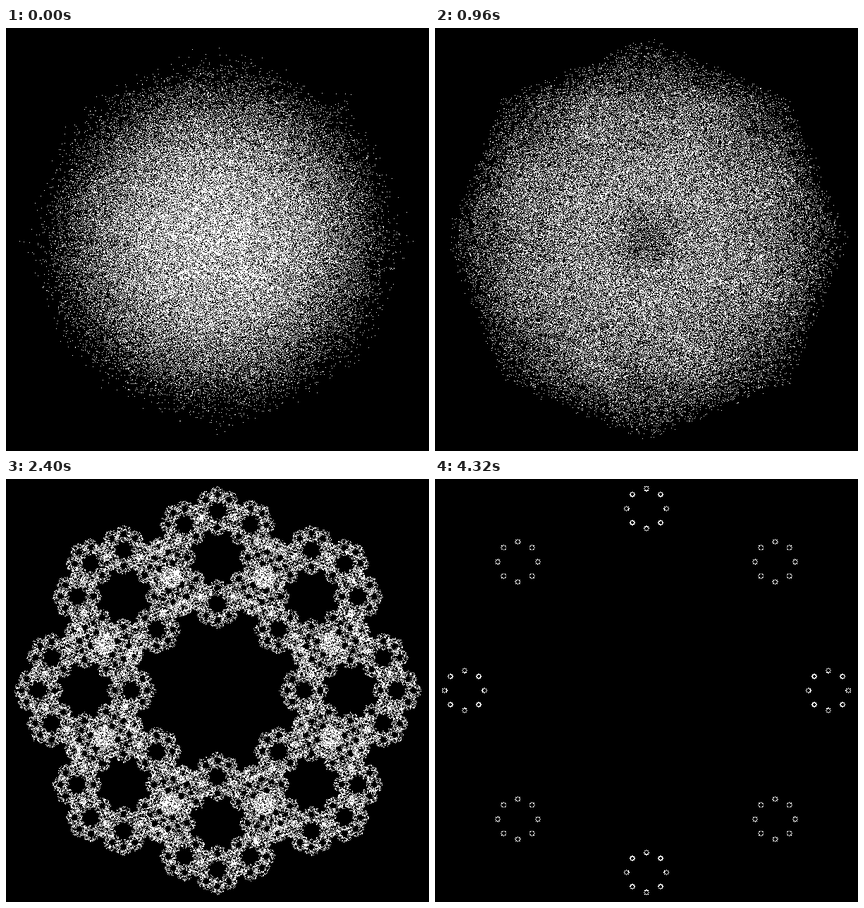
Recreate the animation shown at these times as an HTML page with a canvas. Size 600x600 px, loop 4.4 s.

```html
<!DOCTYPE html>
<html lang="en">
<head>
<meta charset="utf-8">
<title>Chaos game on an octagon</title>
<style>
  html, body { margin: 0; width: 100%; height: 100%; overflow: hidden; background: #000; }
  canvas { display: block; }
</style>
</head>
<body>
<canvas id="stage" width="600" height="600"></canvas>
<script>
const SIZE = 600, CENTER = 300, RADIUS = 290;
const STEPS = 55, STEP_MS = 80, POINTS = 100000;
const BLACK = 0xff000000, WHITE = 0xffffffff;

const ctx = document.getElementById('stage').getContext('2d');
const image = ctx.createImageData(SIZE, SIZE);
const pixels = new Uint32Array(image.data.buffer);

const corners = Array.from({ length: 8 }, (_, i) => {
  const angle = i * Math.PI / 4;
  return [CENTER + RADIUS * Math.cos(angle), CENTER + RADIUS * Math.sin(angle)];
});

// Seeded generator of corner indices 0..7
function cornerPicker(seed) {
  let state = Math.imul(seed + 1, 0x9e3779b1);
  return () => {
    state = (state + 0x6d2b79f5) | 0;
    let h = Math.imul(state ^ (state >>> 15), state | 1);
    h ^= h + Math.imul(h ^ (h >>> 7), h | 61);
    return (h ^ (h >>> 14)) >>> 29;
  };
}

function draw(step) {
  const ratio = 0.65 - step / 100;
  const pick = cornerPicker(step);
  let [x, y] = corners[0];
  pixels.fill(BLACK);
  for (let i = 0; i < POINTS; i++) {
    const [cx, cy] = corners[pick()];
    x = cx + (x - cx) * ratio;
    y = cy + (y - cy) * ratio;
    pixels[Math.floor(y) * SIZE + Math.floor(x)] = WHITE;
  }
  ctx.putImageData(image, 0, 0);
}

let shown = -1;
const start = performance.now();

function tick() {
  const step = Math.floor((performance.now() - start) / STEP_MS) % STEPS;
  if (step !== shown) draw(shown = step);
  requestAnimationFrame(tick);
}
tick();
</script>
</body>
</html>
```
